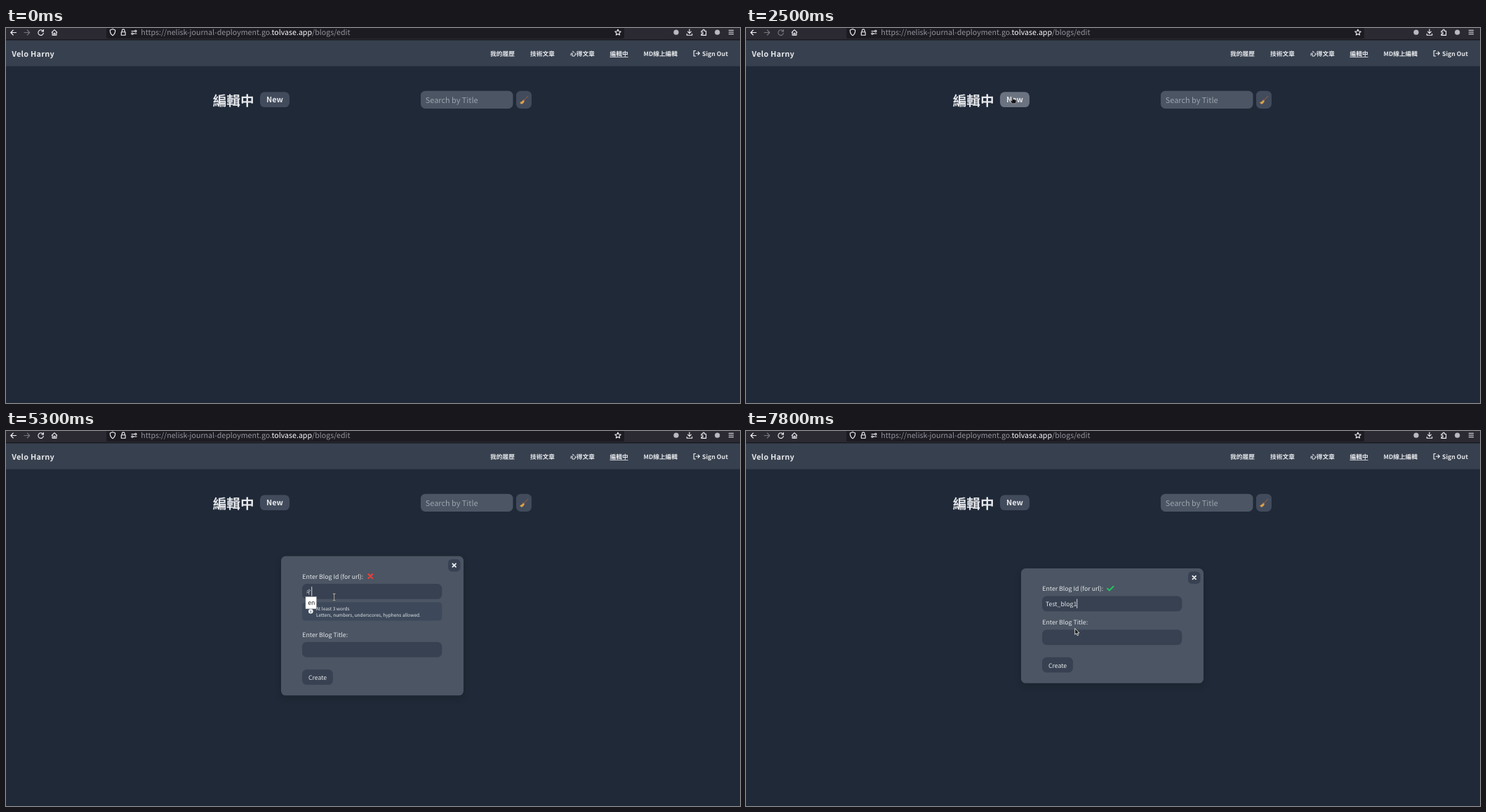
Animation of 1046x535 px, one loop 8000 ms. Source, as an HTML page:

```html
<!DOCTYPE html>
<html lang="zh-Hant">
<head>
<meta charset="utf-8">
<title>Blog editor</title>
<style>
  html, body { margin: 0; width: 100%; height: 100%; overflow: hidden; background: #1f2937; }
  svg { display: block; width: 1046px; height: 535px; }
  text {
    font: 8.72px "Noto Sans CJK TC", "Noto Sans CJK JP", "Noto Sans", sans-serif;
    fill: #e5e7eb; white-space: pre; text-rendering: geometricPrecision;
  }
  .b { font-weight: 700; }
  .big { font-size: 10.9px; }
  .menu { font-size: 10.1px; }
  .ic { fill: none; stroke: #f3f3f6; stroke-width: 1.1; stroke-linecap: round; stroke-linejoin: round; }
  .dark { fill: #374151; }
  #modal { filter: drop-shadow(0 4px 5px rgba(0, 0, 0, .13)); }
</style>
</head>
<body>
<svg viewBox="0 0 1046 535">
  <rect width="1046" height="535" fill="#1f2937"/>

  <!-- browser bar -->
  <rect width="1046" height="16" fill="#2b2a33"/>
  <rect x="143" y="-6" width="738" height="21" rx="2" fill="#1c1b22"/>
  <rect y="16" width="1046" height="1.6" fill="#1a1a20"/>
  <g class="ic">
    <path d="M14.5 6.5H6.8M10.2 3L6.8 6.5L10.2 10"/>
    <path d="M26 6.5H33.7M30.3 3L33.7 6.5L30.3 10" opacity=".38"/>
    <path id="reload" d="M52.9 4.6A3.8 3.8 0 1 0 53.4 7.2M53.4 2.4V5H50.7"/>
    <path id="stop" d="M46.4 4L52.8 10.4M52.8 4L46.4 10.4"/>
    <path d="M65.3 6.2L69 2.7L72.7 6.2M66.1 5.7V10.3H71.9V5.7M68.1 10.2V7.3H69.9V10.2"/>
    <path d="M152 1.6L155.7 3C155.7 7 154.6 9.3 152 10.7C149.4 9.3 148.3 7 148.3 3Z"/>
    <path d="M164.3 5.7H170.1V10.3H164.3ZM165.3 5.5V3.8A1.9 1.9 0 0 1 169.1 3.8V5.5"/>
    <path d="M179 4.5H183.2M181.4 8H186"/>
    <circle cx="184.8" cy="4.5" r="1.2"/><circle cx="180" cy="8" r="1.2"/>
    <path id="star"/>
    <path d="M974 1.8V7.4M971.6 5.2L974 7.6L976.4 5.2M970.3 8.4V10.3H977.7V8.4"/>
    <path d="M991 4.2H993V3.2A1.2 1.2 0 0 1 995.4 3.2V4.2H997.6V10.4H991V8.6H992A1.2 1.2 0 0 0 992 6.2H991Z"/>
    <path d="M1030.2 3.3H1036.6M1030.2 6H1036.6M1030.2 8.7H1036.6"/>
  </g>
  <circle cx="955" cy="6.2" r="3.6" fill="#b9b9c1"/>
  <circle cx="1013.7" cy="6.2" r="3.6" fill="#b9b9c1"/>
  <text x="192.2" y="10.4" style="font-size:10.64px;fill:#94939c"><tspan id="site"></tspan><tspan id="host" fill="#fbfbfe"></tspan>/blogs/edit</text>

  <!-- site header -->
  <rect y="17.6" width="1046" height="36.9" fill="#37404e"/>
  <text class="b big" x="8.2" y="40.9" letter-spacing=".27">Velo Harny</text>
  <g id="nav"></g>
  <g id="signOut">
    <path class="ic" d="M982.6 32.5H980.2V40H982.6M983.2 36.2H988.3M986.2 34L988.4 36.2L986.2 38.4"/>
    <text class="b" x="992" y="40.1">Sign Out</text>
  </g>

  <!-- page head -->
  <text class="b" x="294.7" y="111.4" style="font-size:19.62px">編輯中</text>
  <rect id="newBtn" x="362" y="91.3" width="42" height="21.8" rx="6.5"/>
  <text class="b big" x="371" y="106.3">New</text>
  <rect x="591" y="89.7" width="131.5" height="25.2" rx="6.5" fill="#4b5563"/>
  <text class="big" x="597.8" y="107.1" style="fill:#9ca3af">Search by Title</text>
  <rect x="727" y="89.7" width="22" height="25.2" rx="6.5" fill="#424b5b"/>
  <path d="M743.8 97.4L738.4 102.8" stroke="#a5603c" stroke-width="1" stroke-linecap="round"/>
  <path d="M737.2 102.2L739 104C738.4 106.2 736.8 108 734.6 108.7L732 106.4C734.2 105.7 736 104.2 737.2 102.2Z" fill="#dca04c"/>
  <path d="M736.8 102.6L738.6 104.4" stroke="#c0492f" stroke-width=".7"/>

  <!-- dialog -->
  <g id="modal">
    <rect id="panel" x="392" width="260" rx="6.5" fill="#4b5563"/>
    <g id="upper">
      <rect class="dark" x="630" y="200.4" width="17.5" height="17.5" rx="5.5"/>
      <path class="ic" d="M636.4 206.8L641 211.4M641 206.8L636.4 211.4" style="stroke-width:1.8"/>
      <text x="422.3" y="228.3">Enter Blog Id (for url):</text>
      <path id="bad" d="M516.4 221.8L522.2 227.6M522.2 221.8L516.4 227.6" stroke="#ec4038" stroke-width="2.1" stroke-linecap="round"/>
      <path id="good" d="M515 224.8L517.8 227.5L523.6 221.8" fill="none" stroke="#22c55e" stroke-width="2" stroke-linecap="round" stroke-linejoin="round"/>
      <rect class="dark" x="422" y="235.5" width="199.3" height="21.8" rx="6.5"/>
      <text id="typed" x="427" y="250"></text>
      <rect id="caret" y="239.6" width=".9" height="13.4" fill="#e5e7eb"/>
    </g>
    <g id="hint">
      <rect x="422" y="244.3" width="199.3" height="26.2" rx="4.5" fill="#3d495a"/>
      <circle cx="434.3" cy="257.2" r="3.3" fill="#f3f4f6"/>
      <path d="M434.3 256.8V259M434.3 255.2V255.6" stroke="#374151" stroke-width="1"/>
      <text x="442" y="255.9" style="font-size:6.54px">At least 3 words</text>
      <text x="442" y="264.5" style="font-size:6.54px">Letters, numbers, underscores, hyphens allowed.</text>
    </g>
    <g id="lower">
      <text x="422.3" y="276.3">Enter Blog Title:</text>
      <rect class="dark" x="422" y="283.4" width="199.3" height="21.8" rx="6.5"/>
      <rect class="dark" x="422" y="322.8" width="44" height="21.8" rx="6.5"/>
      <text x="430.9" y="337.5">Create</text>
    </g>
  </g>
  <g id="ime">
    <rect x="427" y="236.6" width="15.2" height="17" fill="#fff" stroke="#c8c8c8" stroke-width=".5"/>
    <text x="430.2" y="248.3" style="fill:#222">en</text>
  </g>
  <g id="list">
    <rect x="422.3" y="239.8" width="199" height="97" rx="2.5" fill="#3f3e3a" stroke="#2a2926" stroke-width=".8"/>
    <rect id="row" x="423" y="243.2" width="198" height="15.3" fill="#5b5a55"/>
    <g id="items"></g>
    <rect x="617.8" y="243.5" width="2.2" height="74.5" rx="1.1" fill="#94938f"/>
  </g>

  <g id="status">
    <rect x="-2" y="520.8" width="276" height="17" rx="2" fill="#3a3935"/>
    <text id="link" class="menu" x="0" y="533.7" style="fill:#dfdbd2"></text>
  </g>

  <g id="arrow"><path d="M0 0V8.8L2 7L3.5 10.2L5 9.5L3.5 6.5H6.2Z" fill="#111" stroke="#fff" stroke-width=".8"/></g>
  <g id="hand"><path d="M-.9 .4Q0 -.6 .8 .4V3L4.4 3.8Q5.4 4.2 5.2 5.4L4.3 9H-.6L-3.4 5.6Q-3.4 4.4 -2.2 4.7L-.9 5.6Z" fill="#111" stroke="#ddd" stroke-width=".5"/></g>
  <g id="beam"><path d="M-2 -4.8H2M0 -4.8V4.8M-2 4.8H2" fill="none" stroke="#222" stroke-width="1.8"/><path d="M-2 -4.8H2M0 -4.8V4.8M-2 4.8H2" fill="none" stroke="#e8e8e8" stroke-width=".8"/></g>
</svg>
<script>
const LOOP = 8000;
const SITE = 'https://nelisk-journal-deployment.go.', HOST = 'tolvase.app';
const NAV = [
  ['我的履歷', 690, 35, '/resume'],
  ['技術文章', 747, 35, '/blogs/tech'],
  ['心得文章', 804, 35, '/blogs/notes'],
  ['編輯中', 860.6, 26, '/blogs/edit'],
  ['MD線上編輯', 908.5, 49, '/editor']
];
const ACTIVE = 3;
const ITEMS = ['Test_blog1', 'Test_blog1a', 'Test_blog2', 'Test_blog12', 'test_playground', 'Test_blog1agtdfgfd'];

const START = {
  cur: null, hover: -1, loading: false, reload: 1, signOut: true, newHot: false,
  modal: '', mark: '', typed: '', caret: 0, ime: false, list: false, row: false
};

// Each step changes part of the state from its time on.
const STEPS = [
  [500, { cur: ['arrow', 936, 58] }],
  [600, { cur: ['hand', 925, 36], hover: 4 }],
  [700, { cur: ['hand', 877, 36], hover: 3 }],
  [800, { cur: ['hand', 825, 36], hover: 2 }],
  [900, { cur: ['hand', 770, 35], hover: 1 }],
  [1000, { cur: ['arrow', 735, 35], hover: -1 }],
  [1100, { cur: ['hand', 715, 35], hover: 0 }],
  [1200, { cur: ['hand', 705, 36] }],
  [1500, { cur: ['hand', 700, 36], loading: true }],
  [1600, { cur: ['arrow', 660, 33] }],
  [1700, { cur: ['arrow', 608, 32] }],
  [1800, { cur: ['arrow', 545, 42], hover: -1 }],
  [1900, { cur: ['arrow', 480, 62] }],
  [2000, { cur: ['arrow', 430, 83] }],
  [2100, { cur: ['hand', 400, 96], newHot: true, signOut: false }],
  [2200, { cur: ['hand', 386, 99] }],
  [2300, { cur: ['hand', 380, 98.7] }],
  [2400, { loading: false, reload: .4, signOut: true }],
  [2700, { reload: .7, modal: 'short' }],
  [2900, { cur: ['arrow', 430, 185], newHot: false }],
  [3000, { cur: ['beam', 464.5, 232.5], reload: 1 }],
  [3200, { caret: 427 }],
  [3300, { cur: null }],
  [3500, { cur: ['beam', 463, 243.5] }],
  [3700, { cur: ['beam', 467.7, 237] }],
  [3800, { cur: null }],
  [4100, { cur: ['beam', 467.7, 237] }],
  [4400, { modal: 'tall', mark: 'bad' }],
  [4600, { caret: 0 }],
  [5300, { typed: 'ㄔ', caret: 435.3, ime: true }],
  [5800, { caret: 0, cur: null }],
  [6100, { typed: '', caret: 427, ime: false }],
  [6200, { cur: ['beam', 466, 194] }],
  [6400, { typed: 't', caret: 430.6, cur: null }],
  [6500, { list: true }],
  [6700, { cur: ['arrow', 464.3, 188.3] }],
  [7000, { cur: ['arrow', 479.3, 221], caret: 0 }],
  [7200, { cur: ['arrow', 480, 240.2] }],
  [7400, { cur: ['arrow', 480.5, 246], row: true }],
  [7500, { cur: ['arrow', 480.5, 250] }],
  [7700, { modal: 'short', mark: 'good', typed: 'Test_blog1', caret: 471.3, list: false, row: false }],
  [7800, { cur: ['arrow', 468.7, 281.6] }]
];

const $ = id => document.getElementById(id);
const show = (id, on) => { $(id).style.display = on ? '' : 'none'; };
const shift = (id, x, y) => $(id).setAttribute('transform', `translate(${x} ${y})`);

$('site').textContent = SITE;
$('host').textContent = HOST;
$('nav').innerHTML = NAV.map(([name, x, w], i) =>
  `<text class="b" x="${x}" y="40.1">${name}</text>` +
  `<rect id="line${i}" x="${x}" y="41" width="${w}" height=".8" fill="#e5e7eb"/>`).join('');
$('items').innerHTML = ITEMS.map((s, i) =>
  `<text class="menu" x="426.4" y="${254.8 + i * 15.25}">${s}</text>`).join('');
$('star').setAttribute('d', 'M' + Array.from({ length: 10 }, (_, i) => {
  const a = i * Math.PI / 5, r = i % 2 ? 2.1 : 4.4;
  return `${872 + r * Math.sin(a)} ${6.4 - r * Math.cos(a)}`;
}).join('L') + 'Z');

function stateAt(t) {
  const s = { ...START };
  for (const [at, patch] of STEPS) if (at <= t) Object.assign(s, patch);
  return s;
}

function draw(t) {
  const s = stateAt(t);
  NAV.forEach((_, i) => show('line' + i, i === ACTIVE || i === s.hover));
  show('status', s.hover >= 0);
  if (s.hover >= 0) $('link').textContent = SITE + HOST + NAV[s.hover][3];
  show('stop', s.loading);
  show('reload', !s.loading);
  $('reload').style.opacity = s.reload;
  show('signOut', s.signOut);
  $('newBtn').setAttribute('fill', s.newHot ? '#6b7280' : '#424b5b');

  const grow = s.modal === 'tall' ? 17.5 : 0;
  show('modal', s.modal);
  $('panel').setAttribute('y', 196 - grow);
  $('panel').setAttribute('height', 163.8 + 2 * grow);
  shift('upper', 0, -grow);
  shift('lower', 0, grow);
  show('hint', grow);
  show('bad', s.mark === 'bad');
  show('good', s.mark === 'good');
  $('typed').textContent = s.typed;
  show('caret', s.caret);
  $('caret').setAttribute('x', s.caret);
  show('ime', s.ime);
  show('list', s.list);
  show('row', s.row);

  for (const kind of ['arrow', 'hand', 'beam']) show(kind, s.cur && s.cur[0] === kind);
  if (s.cur) shift(...s.cur);
}

function tick() {
  draw(performance.now() % LOOP);
  requestAnimationFrame(tick);
}
tick();
</script>
</body>
</html>
```
